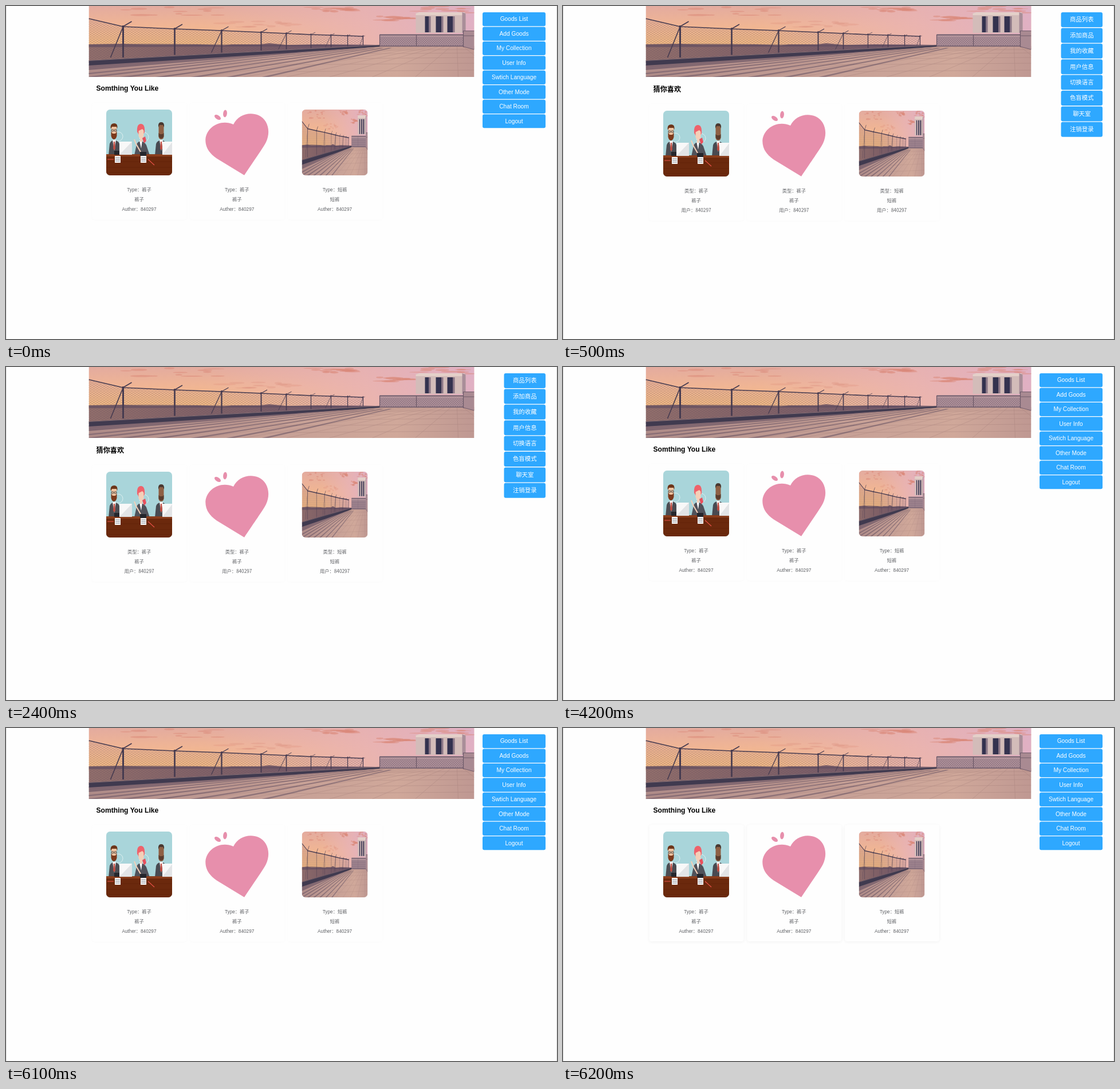
An HTML page that plays this animation: 962x582 px, repeating every 8000 ms.

```html
<!DOCTYPE html>
<html lang="zh-CN">
<head>
<meta charset="utf-8">
<style>
html, body { margin: 0; width: 100%; height: 100%; overflow: hidden; background: #fefefe; }
svg { display: block; }
text { font-family: "Liberation Sans", Arial, "Noto Sans CJK SC", sans-serif; }
.zh text { font-family: "Noto Sans CJK SC", "Noto Sans CJK", sans-serif; }
</style>
</head>
<body>
<svg id="stage" width="962" height="582" viewBox="0 0 962 582">
  <defs>
    <linearGradient id="sky" x1="0" y1="0" x2="0" y2="1">
      <stop offset="0" stop-color="#e3ab9f"/><stop offset=".45" stop-color="#f0b594"/>
      <stop offset="1" stop-color="#f6bd80"/>
    </linearGradient>
    <linearGradient id="lilac">
      <stop offset=".3" stop-color="#e9b4b8" stop-opacity="0"/><stop offset=".7" stop-color="#e8b3b8" stop-opacity=".75"/>
      <stop offset="1" stop-color="#dfb0c6" stop-opacity=".95"/>
    </linearGradient>
    <linearGradient id="floor">
      <stop offset="0" stop-color="#b08d8a"/><stop offset=".5" stop-color="#c6a096"/>
      <stop offset=".8" stop-color="#d0a89a"/><stop offset="1" stop-color="#bf9892"/>
    </linearGradient>
    <linearGradient id="town">
      <stop offset="0" stop-color="#94706c"/><stop offset=".35" stop-color="#856468"/>
      <stop offset="1" stop-color="#6b5469"/>
    </linearGradient>
    <pattern id="mesh" width="6" height="4" patternUnits="userSpaceOnUse">
      <path d="M0 0L6 4M0 4L6 0" stroke="#5d4a5b" stroke-width=".5"/>
    </pattern>
    <pattern id="fine" width="4" height="4" patternUnits="userSpaceOnUse">
      <path d="M0 0L4 4M0 4L4 0" stroke="#5a4a62" stroke-width=".6"/>
    </pattern>
    <clipPath id="frame"><rect width="673" height="124"/></clipPath>
    <clipPath id="thumb"><rect width="115" height="115" rx="6.5"/></clipPath>
    <filter id="blur" x="-10%" y="-10%" width="120%" height="120%"><feGaussianBlur stdDeviation="2.5"/></filter>

    <g id="view" clip-path="url(#frame)">
      <rect width="673" height="75" fill="url(#sky)"/>
      <rect width="673" height="75" fill="url(#lilac)"/>
      <g id="clouds" fill="#d98676"></g>
      <path d="M0 67L60 66 100 68 190 67 235 69 250 67 300 67 315 65 345 68 400 67 510 68V80L0 100Z" fill="url(#town)"/>
      <path d="M0 67L100 66 300 68 510 68V70L0 72Z" fill="#5c4a60" opacity=".6"/>
      <path d="M0 102L510 70H673V124H0Z" fill="url(#floor)"/>
      <g id="tiles" stroke="#9a7672" stroke-width=".6" opacity=".5"></g>
      <g id="shade" fill="#5c4a5e"></g>
      <path d="M0 95L240 82 510 68V71L240 89 0 104Z" fill="#403a4f"/>
      <path d="M0 95.500L240 82.500 510 68" stroke="#967b7e" stroke-width=".8" fill="none"/>
      <path d="M0 22L60 36 150 40 232 43 301 46 388 50 479 53V69L0 94Z" fill="url(#mesh)" opacity=".55"/>
      <g id="fence" fill="none" stroke="#463b50"></g>
      <path d="M571 13L577 11H655L658 13V47H571Z" fill="#d3bcb9"/>
      <path d="M571 13L577 11H655L658 13V16H571Z" fill="#e4d0c9"/>
      <path d="M652 11L658 13V47H652Z" fill="#a98e99"/>
      <path d="M587 18H594V46H587ZM606 18H616V46H606ZM626 18H636V46H626Z" fill="#34324f"/>
      <path d="M594 18H597V46H594ZM616 18H619V46H616ZM636 18H639V46H636Z" fill="#8b7686"/>
      <rect x="508" y="49" width="146" height="22" fill="#b3949b"/>
      <rect x="508" y="54" width="146" height="15" fill="url(#fine)" opacity=".65"/>
      <path d="M508 50.5H654M508 70H654" stroke="#6b5868" stroke-width="1.4"/>
      <path d="M654 43H673V76L654 71Z" fill="#a98a92"/>
      <path d="M654 43.5H673M654 52H673M654 71L673 76" stroke="#715c6b" fill="none"/>
      <path d="M508 50V71M572 50V70M654 43V72" stroke="#6b5868" stroke-width="1.2"/>
    </g>

    <g id="panel" clip-path="url(#thumb)">
      <rect width="115" height="115" fill="#a9d5da"/>
      <g fill="none" stroke="#dceff0" stroke-width="1"><circle cx="21" cy="47" r="8"/><circle cx="66" cy="48" r="8"/></g>
      <path d="M4 80L6 60Q7 56 11 54H17Q22 56 23 60L25 80Z" fill="#4b4c52"/>
      <path d="M11 53H17L14 72Z" fill="#fff"/><path d="M13 56H15L16 68 14 71 12 68Z" fill="#c34e43"/>
      <rect x="9" y="27" width="9" height="20" rx="4" fill="#efc3a0"/>
      <path d="M8 34Q6 24 14 24 21 24 19 34L18 30H10Z" fill="#6d3519"/>
      <path d="M8.500 38L11 42H16L18.500 38V46Q17 52 13.500 52 10 52 8.500 46Z" fill="#7c391b"/>
      <path d="M9 35H12.500V38H9ZM14.500 35H18V38H14.500Z" fill="none" stroke="#333" stroke-width=".8"/>
      <path d="M49 80L53 61Q55 56 60 55 67 56 70 62L76 80Z" fill="#50525a"/>
      <path d="M58 54H63L61 68Z" fill="#fff"/>
      <path d="M54 39Q53 25 60.500 25 68 25 67 40L64 44H57Z" fill="#ef626b"/>
      <rect x="56.500" y="33" width="9" height="17" rx="4.500" fill="#f5cfb8"/>
      <path d="M59 47H63V56H59Z" fill="#f5cfb8"/>
      <path d="M55 38Q56 29 66 33L67 38 63 34Z" fill="#ef626b"/>
      <path d="M63 50L68 47 70 55 66 59Z" fill="#e9505c"/>
      <path d="M49 52L52 60 60 74" stroke="#f5cfb8" stroke-width="2" fill="none"/>
      <path d="M85 80L87 60Q88 56 93 54H99Q104 56 106 60L109 80Z" fill="#484a51"/>
      <path d="M93 53H99L96 72Z" fill="#fff"/><path d="M95 56H97L98 68 96 71 94 68Z" fill="#c34e43"/>
      <rect x="91.500" y="24" width="9" height="28" rx="4.500" fill="#8e6044"/>
      <path d="M91 31Q90 22 96 22 102 22 101 31L99 27H93Z" fill="#493830"/>
      <path d="M91.500 41L94 43H98L100.500 41V47Q96 54 91.500 47Z" fill="#5b3c2d"/>
      <rect y="79" width="115" height="36" fill="#6b290d"/>
      <rect y="78" width="115" height="4" fill="#893d1c"/>
      <path d="M0 91H115M0 101H115M0 110H115" stroke="#602109" stroke-width=".7"/>
      <path d="M23 56H45V79H23ZM98 56H116V79H98Z" fill="#f8f8f8"/>
      <path d="M45 56V79H23ZM116 56V79H98Z" fill="#e2e4e6"/>
      <path d="M14 72H23V79H14ZM59 74H70V81H59Z" fill="#25262c"/>
      <path d="M15 81H25V93H15ZM60 81H70V93H60Z" fill="#fff"/>
      <path d="M16 84H24M16 87H24M16 90H24M61 84H69M61 87H69M61 90H69" stroke="#7b7f87"/>
      <path d="M2 87H13M73 87L84 97" stroke="#ed5149" stroke-width="1.200"/>
    </g>

    <g id="heart" fill="#e78fac">
      <path d="M416 295.800L368 266.500C354 257 348 246 348.300 233 350 212 374 197 397 207 405 190 425 184 441 191 458 199 462.500 220 454 238 450 246 444 254 416 295.800Z"/>
      <ellipse cx="382.500" cy="188" rx="3.400" ry="6.400" transform="rotate(6 382.500 188)"/>
      <ellipse cx="369.500" cy="194.500" rx="6.300" ry="3.500" transform="rotate(35 369.500 194.500)"/>
    </g>
  </defs>

  <rect width="962" height="582" fill="#fefefe"/>
  <g id="en"></g>
  <g id="zh" class="zh"></g>
  <g id="detail"></g>
  <path d="M.5 0V582M961.5 0V582" stroke="#e0e0e0"/>
</svg>
<script>
const $ = id => document.getElementById(id);
const BLUE = '#2ea8ff', GREY = '#606266', USER = '840297';

// y is the middle of the capitals
const label = (s, x, y, size, fill, extra = '') =>
  `<text x="${x}" y="${(y + size * .36).toFixed(2)}" font-size="${size}" fill="${fill}" ${extra}>${s}</text>`;
const MID = 'text-anchor="middle"';
const box = (x, y, w, h, r, fill) =>
  `<rect x="${x}" y="${y}" width="${w}" height="${h}" rx="${r}" fill="${fill}"/>`;

function scenery() {
  let seed = 11;
  const rnd = () => (seed = seed * 16807 % 2147483647) / 2147483647;
  const banks = [[145, 8, 80, 13], [425, 6, 36, 4], [538, 22, 30, 4], [625, 5, 50, 7], [295, 32, 60, 5]];
  $('clouds').innerHTML = banks.map(([x, y, w, h], k) => Array.from({ length: 14 }, () =>
    `<ellipse cx="${x + (rnd() * 2 - 1) * w}" cy="${y + (rnd() * 2 - 1) * h}" rx="${6 + rnd() * 14}" ry="${.7 + rnd() * 1.4}" opacity="${k > 3 ? .25 : .5}"/>`).join('')).join('');

  let lines = '';
  for (let i = 0; i < 16; i++) lines += `<path d="M${500 + i * 11} 71L${i * 75 - 330} 124"/>`;
  for (const y of [76, 82, 90, 100, 112]) lines += `<path d="M300 ${y + 3}L673 ${y}"/>`;
  $('tiles').innerHTML = lines;

  let bands = '';
  for (let i = 0; i < 7; i++) {
    const x = i * 62 - 70, top = 440 + i * 14;
    bands += `<path d="M${x} 124L${top} 73L${top + 5} 73.5L${x + 24 - i * 2} 124Z" opacity=".5"/>`;
  }
  $('shade').innerHTML = '<path d="M0 103L500 70.500L0 112Z" opacity=".55"/>' + bands;

  const posts = [[60, 36], [150, 40], [232, 43], [301, 46], [345, 48], [388, 50], [423, 51], [452, 52], [479, 53]];
  $('fence').innerHTML = `<path d="M0 22L${posts.join('L')}" stroke-width="1.6"/>` +
    posts.map(([x, y], i) => {
      const foot = 93 - x * .05, w = Math.max(1.2, 3 - i * .35);
      const brace = i % 2 ? '' : `<path d="M${x} ${y}L${x - 22 + i * 2} ${foot}" stroke-width="${w * .55}"/>`;
      return `<path d="M${x} ${y - 2}V${foot}" stroke-width="${w}"/>` + brace +
        `<path d="M${x - 2} ${y + 1}L${x + 15 - i * 1.5} ${y - 9 + i}" stroke-width="${w * .6}"/>`;
    }).join('');
}

function home(o) {
  const card = (i, kind, pic) => {
    const x = 232.5 + i * 170.8, d = o.shift;
    const rows = [o.type + '：' + kind, kind, o.by + '：' + USER];
    return `<rect class="glow" x="${x - 82}" y="${170 + d}" width="165" height="204" rx="4" fill="#000" filter="url(#blur)"/>` +
      box(x - 82, 169 + d, 165, 204, 4, '#fefefe') + `<g transform="translate(0 ${d})">${pic}</g>` +
      rows.map((s, k) => label(s, x, 321 + k * 17.2 + d, 8.25, GREY, MID)).join('');
  };
  const menu = o.menu.map((s, i) => {
    const y = 11 + i * o.pitch;
    return box(o.left, y, 942 - o.left, o.high, 3, BLUE) +
      label(s, (o.left + 942) / 2, y + o.high / 2 - .3, o.size, '#fff', MID);
  }).join('');
  return '<use href="#view" transform="translate(144.5 0)"/>' +
    label(o.title, 157.5, 143.3 + o.shift, 12.15, '#000', 'font-weight="bold"') +
    card(0, '裤子', '<use href="#panel" transform="translate(175 181)"/>') +
    card(1, '裤子', '<use href="#heart"/>') +
    card(2, '短裤', '<g transform="translate(516.5 181)"><g clip-path="url(#thumb)"><use href="#view" transform="scale(.171 .9275)"/></g></g>') +
    menu;
}

function details() {
  const ink = '#303133', x = 193;
  const rows = [
    ['Type：短裤', 172, 9.1, ink], ['Time：2022-04-03 19:32:37', 190.5, 9.12, ink],
    ['Content：贸易的方式看来费劲但是开了附近的萨克冷静考虑的撒发简历看电视剧弗兰克的撒娇付款了大三', 209, 9.17, ink],
    ['User Comment', 245.3, 9.2, ink], ['Auther：' + USER, 268.5, 7.65, GREY],
    ['fsd dsfsda', 284, 7.65, GREY], ['2022-04-04 10:45:49', 299.3, 7.65, GREY]
  ];
  return '<use href="#view" transform="translate(193 0) scale(.856 .742)"/>' +
    '<path d="M712.6 105.5H715.6V113.5H712.6ZM717.5 105.5H725Q727.6 105.5 727.6 109V110.500Q727.600 113.300 725.500 113.300H721.700V119Q721.700 120.500 720.500 120.500 718.800 120.500 718.800 118.500V115L717.500 113Z" fill="none" stroke="#111" stroke-width="1.3" stroke-linejoin="round"/>' +
    '<use href="#heart" transform="translate(702.7 78.6) scale(.143)"/>' +
    label('0', 739.2, 110.5, 8.3, ink, MID) + label('0', 779.2, 110.5, 8.3, ink, MID) +
    box(680, 134, 89, 25, 6, '#bfa07e') + label('Collection', 724.3, 146.5, 9.15, '#fff', MID) +
    rows.map(([s, y, size, fill]) => label(s, x, y, size, fill)).join('') +
    `<circle cx="878.5" cy="535.5" r="19.2" fill="${BLUE}"/>` +
    '<path d="M873.500 535.500H883.500M878.500 530.500V540.500" stroke="#fff" stroke-width="1.8"/>';
}

scenery();
$('en').innerHTML = home({
  title: 'Somthing You Like', type: 'Type', by: 'Auther', shift: 0,
  left: 832, pitch: 25.45, high: 24.2, size: 10.2,
  menu: ['Goods List', 'Add Goods', 'My Collection', 'User Info', 'Swtich Language', 'Other Mode', 'Chat Room', 'Logout']
});
$('zh').innerHTML = home({
  title: '猜你喜欢', type: '类型', by: '用户', shift: 2,
  left: 869.5, pitch: 27.4, high: 26, size: 10.4,
  menu: ['商品列表', '添加商品', '我的收藏', '用户信息', '切换语言', '色盲模式', '聊天室', '注销登录']
});
$('detail').innerHTML = details();

const glows = document.querySelectorAll('.glow');
const cuts = [[0, 'en'], [500, 'zh'], [1800, 'en'], [2400, 'zh'], [4200, 'en'], [4800, 'detail'], [6100, 'en']];

function draw(ms) {
  const t = ms % 8000;
  const page = cuts.filter(c => c[0] <= t).pop()[1];
  for (const id of ['en', 'zh', 'detail']) $(id).style.display = id === page ? '' : 'none';
  const glow = t >= 6200 ? .05 : .015;
  glows.forEach(g => g.setAttribute('opacity', glow));
}

const start = performance.now();
function tick() {
  draw(performance.now() - start);
  requestAnimationFrame(tick);
}
draw(0);
requestAnimationFrame(tick);
</script>
</body>
</html>
```
